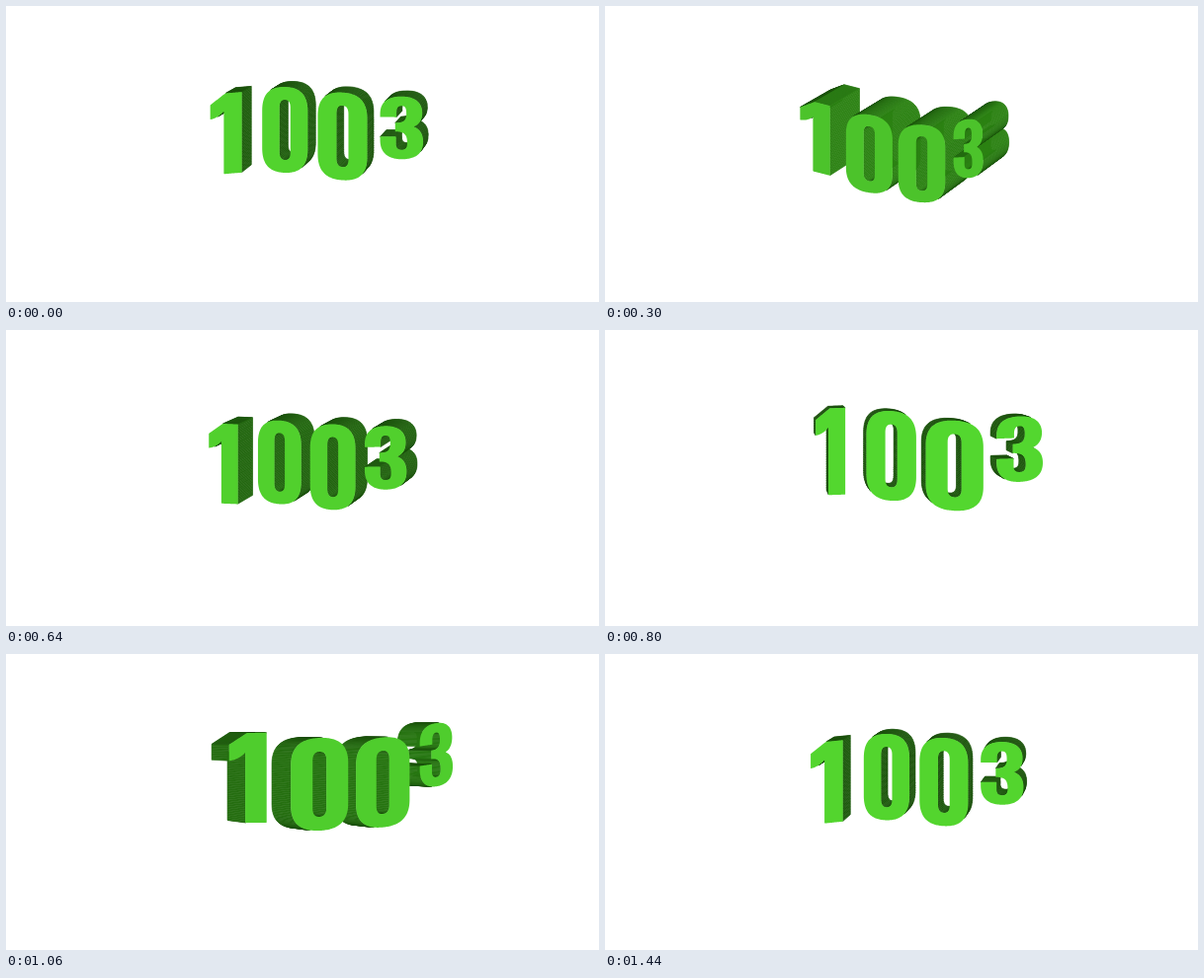
An HTML page with a canvas for the animation above (1460 ms loop, 600x300 px).

```html
<!DOCTYPE html>
<html lang="en">
<head>
<meta charset="utf-8">
<title>100³</title>
<style>
  html, body { margin: 0; width: 100%; height: 100%; overflow: hidden; background: #fff; }
  canvas { display: block; }
</style>
</head>
<body>
<canvas id="stage" width="600" height="300"></canvas>
<script>
const ctx = document.getElementById('stage').getContext('2d');
const LOOP = 1460, STEP = 20;
const CENTER = [315, 130], SHRINK = 0.025;

// Outlines in a 100 x 100 box: outer contours clockwise, holes the other way.
const ONE = ['M0 13L48 0H100V100H43V22Q25 30 0 31Z'];
const ZERO = [
  'M0 28C0 8 18 0 50 0S100 8 100 28V72C100 92 82 100 50 100S0 92 0 72Z',
  'M38 24V76C38 82 42 85 50 85S62 82 62 76V24C62 18 58 15 50 15S38 18 38 24Z'
];
const THREE = ['M0 33V28C0 8 20 0 50 0C85 0 98 12 98 26C98 38 90 45 78 48C93 52 100 60 100 72' +
  'C100 92 80 100 50 100C15 100 0 88 0 70V64H37V76C37 82 41 85 50 85C59 85 63 82 63 74' +
  'C63 60 55 56 35 56V42C55 42 61 38 61 27C61 18 58 15 50 15C42 15 38 18 38 26V33Z'];

// Poses at these times; the motion is a sum of two harmonics fitted through them.
const TIMES = [0, 140, 460, 800, 1060, 1220];
const DEPTH = [[7.5, -7.5], [20, -13], [26, -15.5], [-4, -3], [-20, -2], [-14, 0]];

// Each pose: left, right, top, bottom, slope.
const glyphs = [
  glyph(ONE, 0.72, [
    [207, 239, 88, 169.5, -0.17], [199, 228.5, 89, 164.5, 0.15], [200, 231, 106, 178.5, 0.2],
    [213, 243, 79, 167, 0], [226, 264, 80, 171, -0.07], [223, 262, 88.5, 178, 0]]),
  glyph(ZERO, 0.5, [
    [259, 305, 82, 169, 0.03], [246, 293, 95, 178, 0.12], [249, 293, 109, 188, 0.1],
    [264.5, 315, 82, 173, 0.06], [288, 346, 85, 179, -0.04], [288, 341, 82, 174, -0.1]]),
  glyph(ZERO, 0.5, [
    [314, 365, 87, 177, 0.08], [302, 355, 109, 192, 0.1], [299, 339, 111, 191, 0],
    [325, 383, 92, 183, 0.04], [353, 408, 84, 176, -0.08], [351, 395, 75, 165, -0.13]]),
  glyph(THREE, 0.5, [
    [379, 422, 93, 155, 0], [367, 407, 107, 170, 0], [345, 375, 109, 169, -0.05],
    [396, 443, 87, 154, -0.03], [419, 452, 71, 134, -0.15], [403, 437, 67, 132, -0.1]])
];

function glyph(outlines, pivot, poses) {
  return { contours: outlines.map(sample), pivot, poses };
}

function sample(d) {
  const path = document.createElementNS('http://www.w3.org/2000/svg', 'path');
  path.setAttribute('d', d);
  const length = path.getTotalLength(), n = Math.ceil(length / 2);
  return Array.from({ length: n }, (_, i) => {
    const p = path.getPointAtLength(length * i / n);
    return [p.x / 100, p.y / 100];
  });
}

function harmonics(t) {
  const a = 2 * Math.PI * t / LOOP;
  return [1, Math.cos(a), Math.sin(a), Math.cos(2 * a), Math.sin(2 * a)];
}

const dot = (a, b) => a.reduce((sum, v, i) => sum + v * b[i], 0);

function solve(matrix, rhs) {
  const rows = matrix.map((row, i) => [...row, rhs[i]]);
  rows.forEach((row, i) => {
    const pivot = row[i];
    for (let k = 0; k < row.length; k++) row[k] /= pivot;
    rows.forEach((other, j) => {
      if (j === i) return;
      const f = other[i];
      for (let k = 0; k < row.length; k++) other[k] -= f * row[k];
    });
  });
  return rows.map(row => row[row.length - 1]);
}

const basis = TIMES.map(harmonics);
const normal = basis[0].map((_, i) => basis[0].map((_, j) => dot(basis.map(b => b[i]), basis.map(b => b[j]))));

// Least-squares weight of every pose at time t.
function weightsAt(t) {
  const s = solve(normal, harmonics(t));
  return basis.map(b => dot(b, s));
}

const blend = (weights, poses) => poses[0].map((_, i) => dot(weights, poses.map(p => p[i])));
const green = (g, r, b) => `rgb(${g * r | 0},${g | 0},${g * b | 0})`;

function trace(points) {
  points.forEach(([x, y], i) => i ? ctx.lineTo(x, y) : ctx.moveTo(x, y));
  ctx.closePath();
}

function drawGlyph({ contours, pivot, poses }, weights, [dx, dy]) {
  const [left, right, top, bottom, slope] = blend(weights, poses);
  const width = right - left;
  const front = contours.map(c => c.map(([u, v]) =>
    [left + u * width, top + v * (bottom - top) + slope * (u - pivot) * width]));
  const shift = ([x, y]) => [dx - (x - CENTER[0]) * SHRINK, dy - (y - CENTER[1]) * SHRINK];
  const back = p => { const s = shift(p); return [p[0] + s[0], p[1] + s[1]]; };

  const sides = [];
  for (const contour of front) {
    contour.forEach((p, i) => {
      const q = contour[(i + 1) % contour.length];
      const tx = q[0] - p[0], ty = q[1] - p[1];
      const facing = dot([ty, -tx], shift(p)) / (Math.hypot(tx, ty) || 1);
      if (facing > 0) sides.push({ quad: [p, q, back(q), back(p)], facing, order: p[0] * dx + p[1] * dy });
    });
  }
  sides.sort((a, b) => a.order - b.order);
  ctx.lineWidth = 0.6;
  for (const { quad, facing } of sides) {
    ctx.fillStyle = ctx.strokeStyle = green(74 + 2 * Math.min(facing, 28), 0.34, 0.16);
    ctx.beginPath();
    trace(quad);
    ctx.fill();
    ctx.stroke();
  }

  ctx.fillStyle = green(219 - 0.7 * Math.hypot(dx, dy), 0.39, 0.22);
  ctx.beginPath();
  front.forEach(trace);
  ctx.fill('evenodd');
}

function draw() {
  const t = Math.floor(performance.now() / STEP) * STEP % LOOP;
  const weights = weightsAt(t);
  const depth = blend(weights, DEPTH);
  ctx.fillStyle = '#fff';
  ctx.fillRect(0, 0, 600, 300);
  const order = depth[0] > 0 ? glyphs : [...glyphs].reverse();
  order.forEach(g => drawGlyph(g, weights, depth));
  requestAnimationFrame(draw);
}
draw();
</script>
</body>
</html>
```
